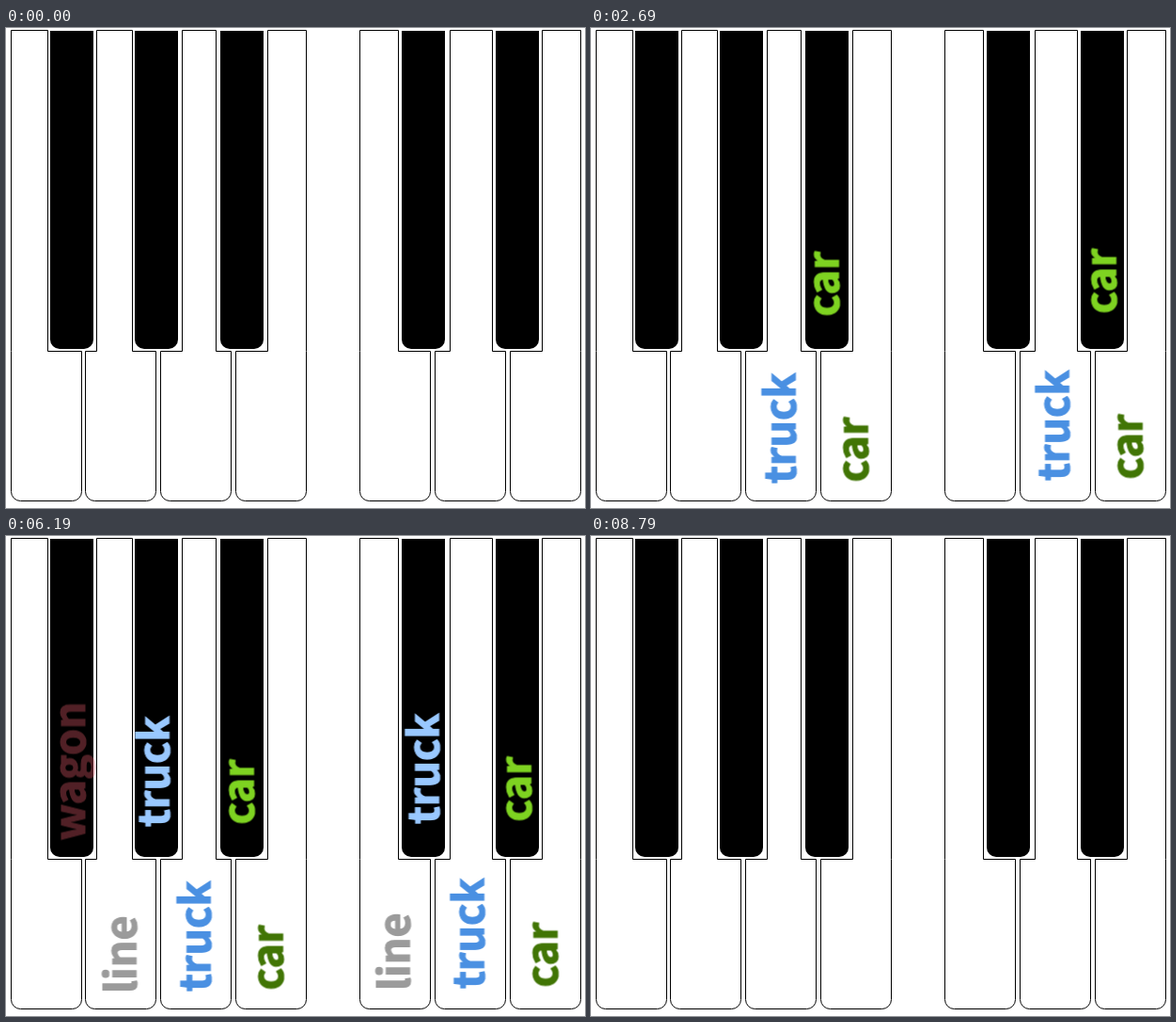
These frames come from a looping animation (616x510 px, 8890 ms). An HTML page:

```html
<!DOCTYPE html>
<html lang="en">
<head>
<meta charset="utf-8">
<title>Piano words</title>
<style>
  html, body { margin: 0; width: 100%; height: 100%; overflow: hidden; background: #fff; }
  svg { display: block; width: 616px; height: 510px; }
  .white { fill: #fff; stroke: #000; stroke-width: 1; }
  text {
    font: 700 44.8px "Noto Sans CJK JP", "Noto Sans CJK SC", "Noto Sans CJK", sans-serif;
    stroke-width: 1.2;
  }
</style>
</head>
<body>
<svg id="stage" viewBox="0 0 616 510"></svg>
<script>
const LOOP = 8890;
const stage = document.getElementById('stage');

function add(tag, attrs, text = '') {
  const node = document.createElementNS('http://www.w3.org/2000/svg', tag);
  for (const name in attrs) node.setAttribute(name, attrs[name]);
  node.textContent = text;
  stage.append(node);
  return node;
}

// White keys: left and right edge of the narrow top, left edge of the wide base.
const whiteKeys = [
  [5, 44, 5], [96, 134, 84], [187, 223, 164], [278, 319, 244],
  [376, 417, 376], [472, 517, 456], [570, 611, 536]
];
for (const [left, right, base] of whiteKeys) {
  add('path', {
    class: 'white',
    transform: 'translate(.5 .5)',
    d: `M${left} 2H${right}V343H${base + 75}V492a10 10 0 0 1-10 10H${base + 10}a10 10 0 0 1-10-10V343H${left}Z`
  });
}

for (const x of [47, 137, 228, 421, 521]) {
  add('path', { d: `M${x} 3h46v328a10 10 0 0 1-10 10h-26a10 10 0 0 1-10-10Z` });
}

// Each word: colour, [baseline x, start y] of every copy, times of the fade-in steps, first opacity.
const every100 = (start, count) => Array.from({ length: count }, (_, i) => start + i * 100);
const words = [
  ['car', '#417505', [[294.5, 482.5], [586.5, 479.5]], every100(790, 5)],
  ['car', '#7ed321', [[263.5, 306.5], [558.5, 303.5]], every100(1390, 4)],
  ['truck', '#4a90e2', [[217.5, 484], [508.5, 481]], every100(2390, 4)],
  ['truck', '#99c8ff', [[173.5, 309], [460.5, 306]], [3090, 3190, 3330, 3390]],
  ['line', '#9b9b9b', [[138.5, 486], [429.5, 483]], every100(4890, 4)],
  ['wagon', '#ff6575', [[84, 323.5]], every100(6190, 5), .32],
  ['wagon', '#d6171f', [[55, 499.5]], every100(6790, 4)]
];
const fadeOut = every100(8290, 6);

function fadeFrames(times, first = 1 / times.length) {
  const frame = (time, opacity) => ({ offset: time / LOOP, opacity, easing: 'step-end' });
  const rise = i => first + (1 - first) * i / (times.length - 1);
  return [
    frame(0, 0),
    ...times.map((time, i) => frame(time, rise(i))),
    ...fadeOut.map((time, i) => frame(time, 1 - (i + 1) / fadeOut.length)),
    frame(LOOP, 0)
  ];
}

for (const [word, color, places, times, first] of words) {
  for (const [x, y] of places) {
    add('text', { fill: color, stroke: color, transform: `translate(${x} ${y}) rotate(-90)` }, word)
      .animate(fadeFrames(times, first), { duration: LOOP, iterations: Infinity });
  }
}
</script>
</body>
</html>
```
